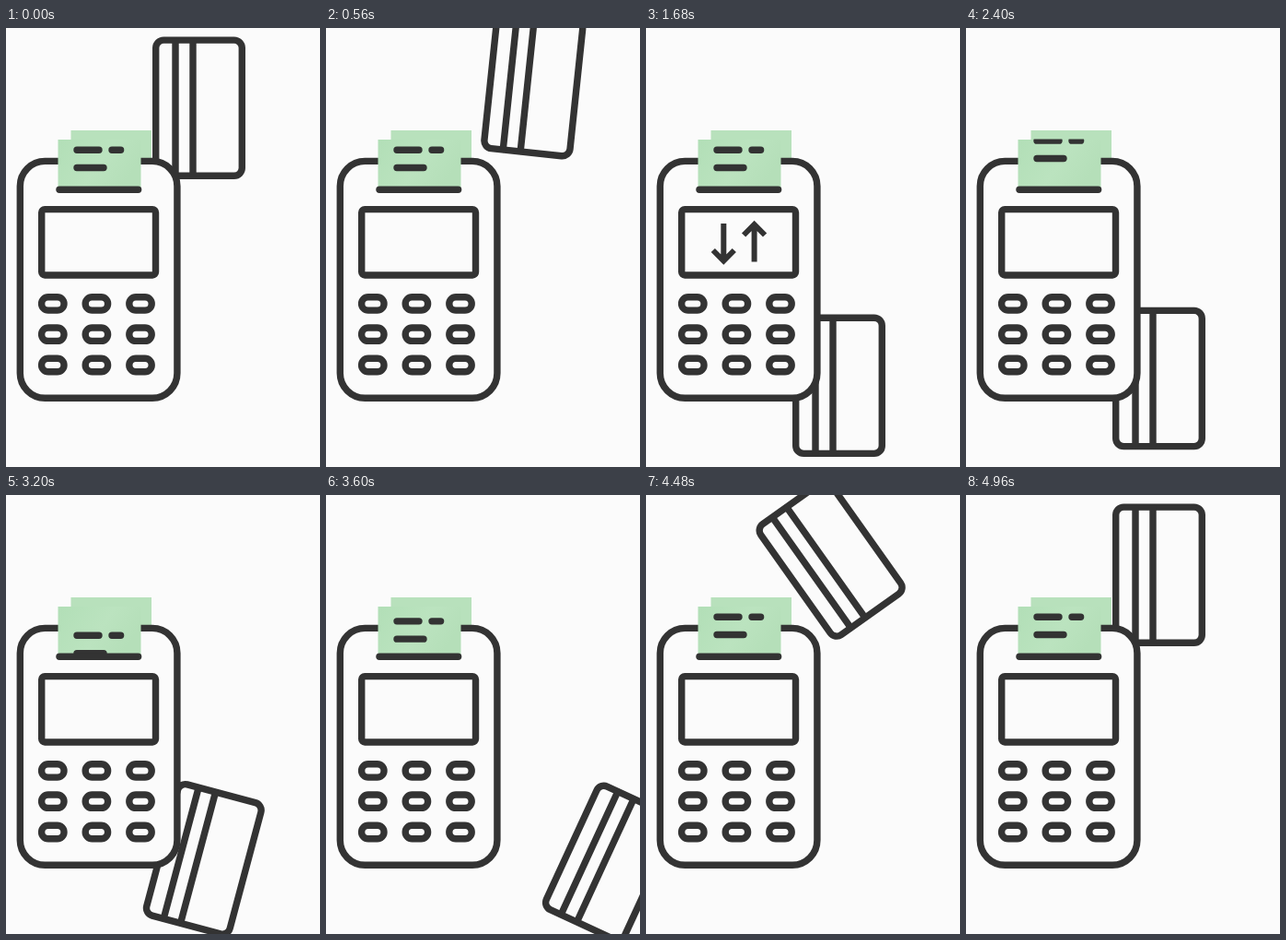
These frames come from a looping animation (341x476 px, 5040 ms). An HTML page:

```html
<!DOCTYPE html>
<html lang="en">
<head>
<meta charset="utf-8">
<title>Card payment</title>
<style>
html, body { margin: 0; width: 100%; height: 100%; overflow: hidden; background: #fbfbfb; }
svg { display: block; }
.ink { fill: none; stroke: #333; stroke-width: 7.4; stroke-linecap: round; stroke-linejoin: round; }
#arrows { stroke-width: 6; stroke-linecap: butt; stroke-linejoin: miter; }
</style>
</head>
<body>
<svg width="341" height="476" viewBox="0 0 341 476">
  <defs>
    <linearGradient id="paper" x2="1" y2=".4">
      <stop offset="0" stop-color="#b2dfb7"/>
      <stop offset=".6" stop-color="#bbe3bf"/>
      <stop offset="1" stop-color="#b5dfb9"/>
    </linearGradient>
    <clipPath id="paperClip"><path d="M56 120.5h91v52h-91z"/></clipPath>
    <clipPath id="screenClip"><path d="M39 197h124v71H39z"/></clipPath>
  </defs>

  <g id="card" class="ink">
    <rect x="-46.8" y="-73.6" width="93.6" height="147.2" rx="8.5"/>
    <path d="M-25.5-73V73M-6.5-73V73"/>
    <path id="trail"/>
  </g>

  <path d="M70.5 111H158v61H70.5z" fill="#b8e1bc"/>
  <rect class="ink" x="15.3" y="144.4" width="170.6" height="256.8" rx="27" style="fill:#fbfbfb"/>
  <path d="M56.5 121h90v53h-90z" fill="url(#paper)"/>
  <g clip-path="url(#paperClip)"><path id="print" class="ink"/></g>
  <path class="ink" d="M58 175.2h85.6"/>

  <g clip-path="url(#screenClip)"><path id="arrows" class="ink"/></g>
  <rect class="ink" x="38.7" y="196.6" width="123.8" height="71.4" rx="3.4"/>
  <g id="keys" class="ink"></g>
</svg>
<script>
const LOOP = 5040, STEP = 80;
const $ = id => document.getElementById(id);

// Progress of t from a to b, shaped from 0 to 1
const ramp = (t, a, b) => Math.min(1, Math.max(0, (t - a) / (b - a)));
const smooth = (t, a, b) => { const u = ramp(t, a, b); return u * u * (3 - 2 * u); };
const easeOut = (t, a, b) => 1 - (1 - ramp(t, a, b)) ** 3;
const easeInOut = (t, a, b) => {
  const u = ramp(t, a, b);
  return u < .5 ? 4 * u ** 3 : 1 - 4 * (1 - u) ** 3;
};
const bump = (t, a, b) => Math.sin(Math.PI * ramp(t, a, b));

for (let i = 0; i < 9; i++) {
  const x = 38.6 + 47.6 * (i % 3), y = 291.7 + 33.3 * Math.floor(i / 3);
  $("keys").innerHTML += `<rect x="${x}" y="${y}" width="24.4" height="14.4" rx="7.2"/>`;
}

// Wind up, swipe down, tilt, then fly round the right side back to the top
function cardPose(t) {
  const wind = smooth(t, 240, 560) - smooth(t, 640, 1040);
  const swipe = smooth(t, 640, 1368);
  const tilt = smooth(t, 2840, 3440);
  const fly = easeInOut(t, 3440, 4920);
  const aside = smooth(t, 3440, 3840) - easeOut(t, 4000, 4526);
  return {
    x: 209.5 + 15.8 * wind + 8.2 * (tilt - fly) + 260 * aside - 14 * bump(t, 4320, 4960),
    y: 86.7 - 25.2 * wind + 293.3 * swipe + 18 * bump(t, 1200, 1760)
      + 23 * tilt - 316.3 * fly - 156 * Math.sin(Math.PI * fly),
    angle: 6 * wind + 23.1 * tilt + 336.9 * fly
  };
}

// Two lines of print scroll up out of the slot, once round
function printLines(t) {
  const span = 61, shift = -span * ramp(t, 2140, 3720);
  return [shift, shift + span].map(d =>
    `M77 ${132.2 + d}h24M115 ${132.2 + d}h9.6M77 ${151.5 + d}h29`).join("");
}

function draw(t) {
  const { x, y, angle } = cardPose(t);
  $("card").setAttribute("transform", `translate(${x} ${y}) rotate(${angle})`);

  const len = 32 * bump(t, 880, 1400);
  $("trail").setAttribute("d", len > 1
    ? `M-25.5-73v${-len}M-6.5-73v${3 - len}M46.8-66v${-len - 7}` : "");

  $("print").setAttribute("d", printLines(t));

  const tip = 192 + 64 * smooth(t, 880, 1360) + 56 * smooth(t, 1680, 2080);
  const upTip = 465.5 - tip;
  $("arrows").setAttribute("d",
    `M84.3 ${tip - 4}v-40m-11.5 29l11.5 11.5l11.5-11.5` +
    `M117.6 ${upTip + 4}v40m-11.5-29l11.5-11.5l11.5 11.5`);
}

function frame() {
  const t = performance.now() % LOOP;
  draw(t - t % STEP);
  requestAnimationFrame(frame);
}
frame();
</script>
</body>
</html>
```
